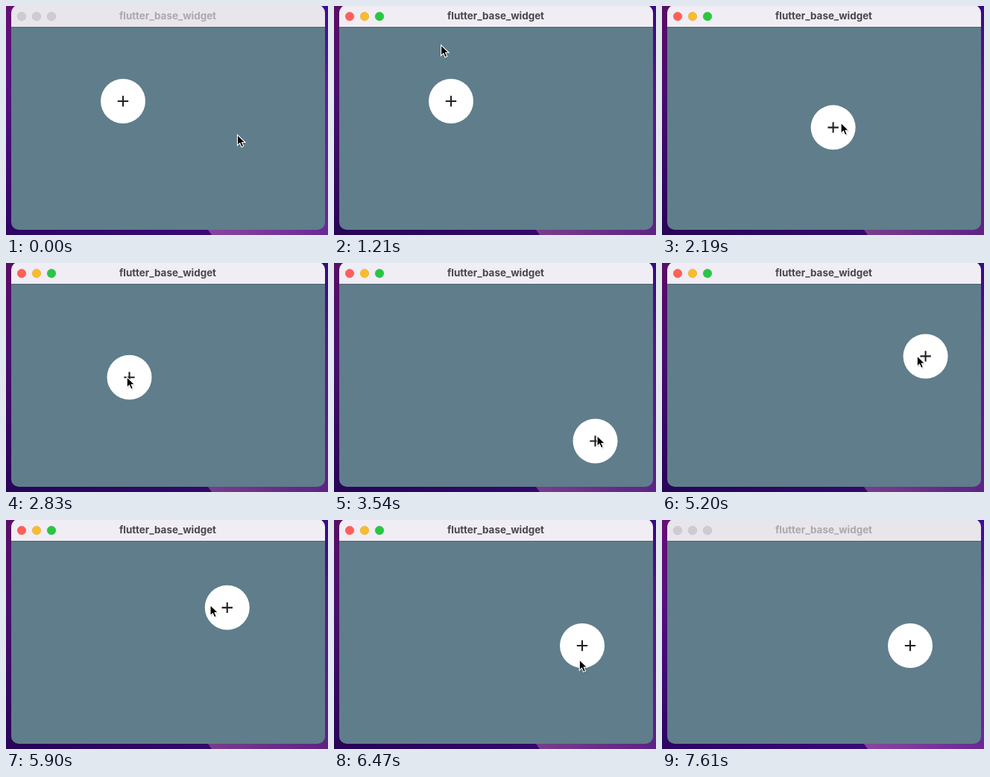
These frames come from a looping animation (432x308 px, 7.68 s). An HTML page:

```html
<!DOCTYPE html>
<html lang="en">
<head>
<meta charset="utf-8">
<title>flutter_base_widget</title>
<style>
  html, body { margin: 0; width: 100%; height: 100%; overflow: hidden; background: #2b0a63; }
  svg { display: block; width: 432px; height: 308px; }
  text { font: 700 13.4px Inter, "Open Sans", sans-serif; text-anchor: middle; }
  #bar { fill: #f0edf5; }
  #title { fill: #49464d; }
  #shade { opacity: .12; }
  .idle #bar { fill: #e8e5eb; }
  .idle #title { fill: #aba8ae; }
  .idle #shade { opacity: 0; }
  .idle .light { fill: #cfcbd2; stroke: #bbb7be; }
</style>
</head>
<body>
<svg id="stage" viewBox="0 0 432 308">
  <defs>
    <linearGradient id="left" x2="0" y2="1">
      <stop stop-color="#660f74"/><stop offset=".4" stop-color="#52107c"/><stop offset="1" stop-color="#2c0663"/>
    </linearGradient>
    <linearGradient id="right" x2="0" y2="1">
      <stop stop-color="#3c0c96"/><stop offset=".35" stop-color="#611a9c"/><stop offset="1" stop-color="#6a2896"/>
    </linearGradient>
    <linearGradient id="floor">
      <stop stop-color="#2c0663"/><stop offset="1" stop-color="#3a0a78"/>
    </linearGradient>
    <linearGradient id="hill">
      <stop stop-color="#8a479e"/><stop offset="1" stop-color="#6a2896"/>
    </linearGradient>
    <clipPath id="frame"><rect x="7" y="-1" width="421" height="302" rx="10"/></clipPath>
  </defs>

  <rect width="216" height="308" fill="url(#left)"/>
  <rect x="216" width="216" height="308" fill="url(#right)"/>
  <rect x="9" y="290" width="270" height="18" fill="url(#floor)"/>
  <path d="M263 290 276 308H432V290z" fill="url(#hill)"/>
  <rect id="shade" width="432" height="308"/>

  <g clip-path="url(#frame)">
    <rect width="432" height="308" fill="#607d8b"/>
    <rect id="bar" width="432" height="28"/>
    <rect y="28" width="432" height="1" opacity=".2"/>
  </g>
  <g stroke-width=".5">
    <circle class="light" cx="21" cy="14" r="5.75" fill="#ff5f57" stroke="#e9524a"/>
    <circle class="light" cx="41" cy="14" r="5.75" fill="#f9bc2e" stroke="#e0a323"/>
    <circle class="light" cx="61" cy="14" r="5.75" fill="#28c840" stroke="#1fab33"/>
  </g>
  <text id="title" x="217" y="18">flutter_base_widget</text>

  <g id="button">
    <circle r="30" fill="#fff"/>
    <path d="M-7.2 0H7.2M0-7.2V7.2" stroke="#222" stroke-width="2.1"/>
  </g>
  <g id="pointer">
    <path d="M1.5 2.5V16.5L4.8 13.5 7 18.5 9.6 17.4 7.4 12.5H11.8z" opacity=".18"/>
    <path d="M.5.8V15L3.8 12 6 17.2 8.7 16.1 6.5 11H11z" stroke="#fff" stroke-width="1.1"/>
  </g>
</svg>
<script>
const LOOP = 7680, STEP = 58.5;
const LEAD = 25; // ms by which the pointer runs ahead of the dragged button
const $ = id => document.getElementById(id);

// Each move starts where the last one ended and passes its points at an even beat
const moves = [
  { from: 682, to: 1500, points: [[240, 80], [150, 24], [150, 80], [182, 116]] },
  { from: 1500, to: 1720, points: [[159, 120]] },
  { from: 1962, to: 3540, drag: true, points: [
    [227, 163], [292, 150], [240, 111], [161, 160], [178, 220], [262, 240], [350.5, 239.5]] },
  { from: 3542, to: 4400, drag: true, points: [
    [330, 110], [200, 58], [95, 135], [170, 245], [302, 175], [342, 124], [352, 137], [353, 133]] },
  { from: 4732, to: 5020, points: [[372, 125], [345, 115], [323, 128], [342, 137]] },
  { from: 5142, to: 6282, drag: true, points: [
    [339, 112], [235, 103], [110, 135], [125, 232], [325, 215], [297, 118], [203, 130],
    [240, 170], [333, 169]] },
  { from: 6411, to: 6690, points: [[345, 230], [361, 320]] }
];

// Smooth curve through the points, at rest at both ends; u runs from 0 to 1
function glide(points, u) {
  const last = points.length - 1;
  const i = Math.min(last - 1, Math.floor(u * last)), s = u * last - i;
  const tangent = (k, c) => k > 0 && k < last ? (points[k + 1][c] - points[k - 1][c]) / 2 : 0;
  const pos = [], speed = [];
  for (const c of [0, 1]) {
    const p = points[i][c], m = tangent(i, c), n = tangent(i + 1, c), d = points[i + 1][c] - p;
    const a = m + n - 2 * d, b = 3 * d - 2 * m - n;
    pos[c] = p + s * (m + s * (b + s * a));
    speed[c] = (m + s * (2 * b + s * 3 * a)) * last;
  }
  return { pos, speed };
}

function sceneAt(t) {
  let hand = [310, 172.5], ball = [157, 128];
  for (const { from, to, drag, points } of moves) {
    if (t < from) break;
    const length = to - from;
    const held = Math.floor((t - from) / STEP + .2) * STEP;
    const { pos, speed } = glide([drag ? ball : hand, ...points], Math.min(1, held / length));
    if (drag) {
      hand = pos.map((p, c) => p + hand[c] - ball[c] + speed[c] / length * LEAD);
      ball = pos;
    } else hand = pos;
  }
  return { hand, ball };
}

const place = (id, [x, y]) => $(id).setAttribute("transform", `translate(${x} ${y})`);

function draw(now) {
  const t = now % LOOP, { hand, ball } = sceneAt(t);
  place("button", ball);
  place("pointer", hand);
  $("stage").classList.toggle("idle", t < 440 || t >= 7610);
}

const start = performance.now();
function tick() {
  draw(performance.now() - start);
  requestAnimationFrame(tick);
}
tick();
</script>
</body>
</html>
```
